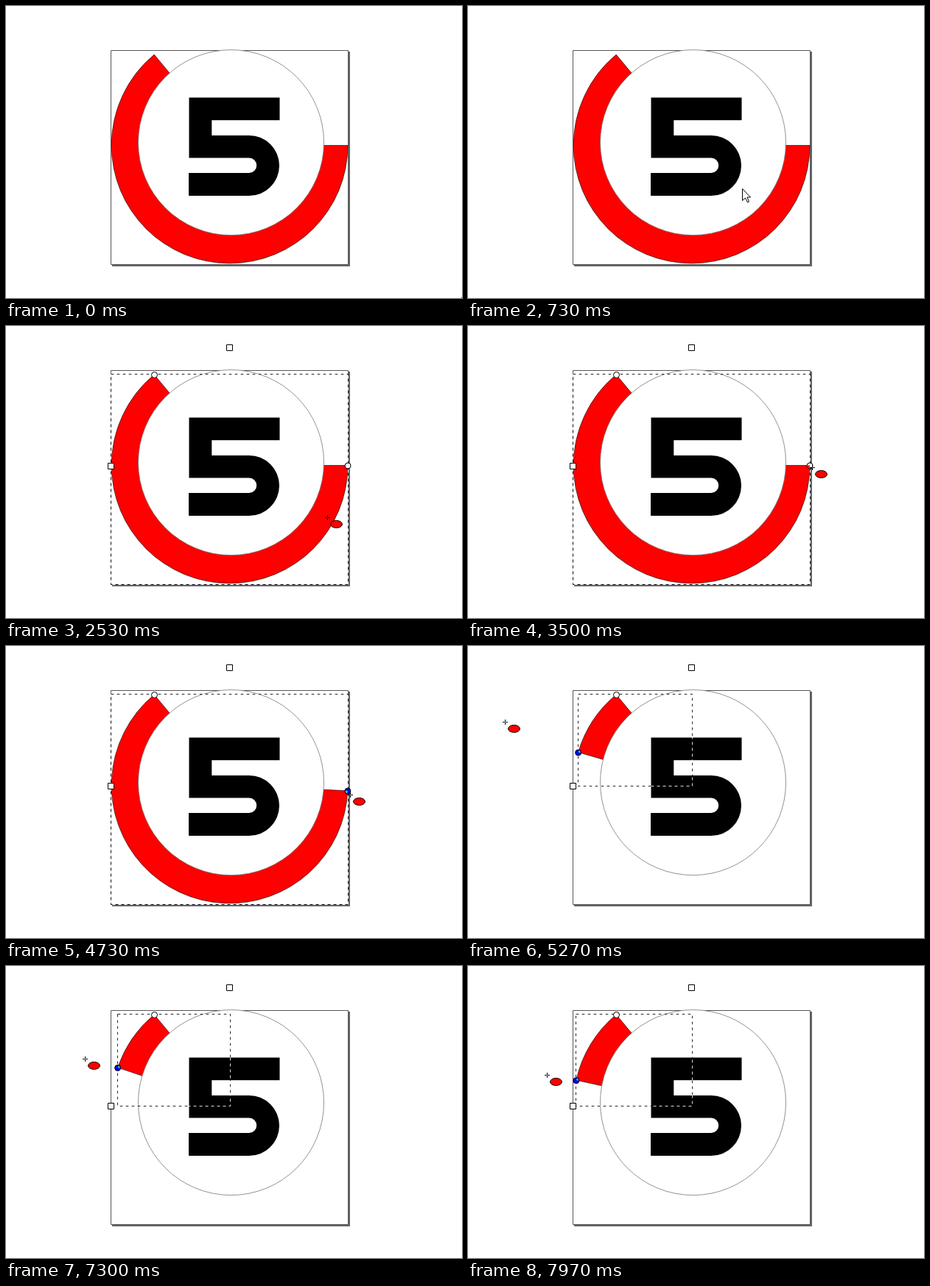
Animation of 619x397 px, one loop 8 s. Source, as an HTML page with a canvas:

```html
<!DOCTYPE html>
<html lang="en">
<head>
<meta charset="utf-8">
<title>Dragging an arc handle</title>
<style>
  html, body { margin: 0; width: 100%; height: 100%; overflow: hidden; background: #fff; }
  canvas { display: block; }
</style>
</head>
<body>
<canvas id="stage" width="619" height="397"></canvas>
<script>
const ctx = document.getElementById('stage').getContext('2d');
const LOOP = 8000, TICK = 100 / 3, TAU = Math.PI * 2, DEG = Math.PI / 180;
const HOVER = 1225, SELECT = 1360, EDIT = 2525, PRESS = 4095;
const GRAB = 1.5; // pointer sits this far below the handle it holds
const pie = { x: 303.6, y: 189.5, r: 160.4 };
const startAngle = Math.atan2(-123.2, -102.2) + TAU;

const mix = (a, b, u) => a + (b - a) * u;
const part = (t, from, to) => Math.min(1, Math.max(0, (t - from) / (to - from)));
const ease = (t, from, to) => { const u = part(t, from, to); return u * u * (3 - 2 * u); };

// straight moves before the drag
const moves = [
  { from: 100, to: 600, x: 351, y: 227 },
  { from: 600, to: 930, x: 409, y: 287 },
  { from: 1600, to: 2300, x: 436, y: 260 },
  { from: 2940, to: 3500, x: 467, y: 192 }
];

function approach(t) {
  let x = 618, y = 396;
  for (const m of moves) {
    const u = ease(t, m.from, m.to);
    x = mix(x, m.x, u);
    y = mix(y, m.y, u);
  }
  return [x, y];
}

// swing round the pie, then hover up and down on its left
function drag(t) {
  const swing = 1 + 200 / (1 + Math.exp((4995 - t) / 65));
  const reach = 164 + 112 * ease(swing, 90, 180);
  const x = pie.x + reach * Math.cos(swing * DEG);
  const y = pie.y + reach * Math.sin(swing * DEG);
  const bob = 20 * Math.sin(Math.PI * part(t, 5750, 6400)) ** 2;
  const restY = 97 + 2 * part(t, 5750, 6400) + bob + 49 * ease(t, 6530, 7970);
  const settle = 1 - (1 - part(t, 5245, 5567)) ** 2;
  return [mix(x, 106.5, settle), mix(y, restY, settle)];
}

const pointer = t => t < PRESS ? approach(t) : drag(t);

// the shape trails the pointer by one tick
function endAngle(t) {
  if (t < PRESS) return 0;
  const [x, y] = pointer(t - TICK);
  return (Math.atan2(y - GRAB - pie.y, x - pie.x) + TAU) % TAU;
}

function paint(fill, stroke, width = 1) {
  if (fill) { ctx.fillStyle = fill; ctx.fill(); }
  if (stroke) { ctx.strokeStyle = stroke; ctx.lineWidth = width; ctx.stroke(); }
}

function polygon(points) {
  ctx.beginPath();
  points.forEach(([x, y]) => ctx.lineTo(x, y));
  ctx.closePath();
}

function disc(x, y, r) {
  ctx.beginPath();
  ctx.arc(x, y, r, 0, TAU);
}

function box(x, y, w, h) {
  ctx.beginPath();
  ctx.rect(x, y, w, h);
}

function tracePie(end) {
  ctx.beginPath();
  ctx.moveTo(pie.x, pie.y);
  ctx.arc(pie.x, pie.y, pie.r, end, startAngle);
  ctx.closePath();
}

function drawPage() {
  box(144, 62, 323, 292);
  paint('#666');
  box(142.5, 60.5, 322, 291);
  paint('#fff', '#555');
}

function drawFive() {
  ctx.beginPath();
  ctx.moveTo(248.5, 124.5);
  ctx.lineTo(371.5, 124.5);
  ctx.lineTo(371.5, 155.3);
  ctx.lineTo(279.3, 155.3);
  ctx.lineTo(279.3, 176);
  ctx.arc(330, 217, 41, -Math.PI / 2, Math.PI / 2);
  ctx.lineTo(248, 258);
  ctx.lineTo(248, 227);
  ctx.arc(330, 216.8, 10.2, Math.PI / 2, -Math.PI / 2, true);
  ctx.lineTo(248.5, 206.6);
  ctx.closePath();
  paint('#000');
}

function drawBounds(end) {
  const ex = pie.x + pie.r * Math.cos(end), ey = pie.y + pie.r * Math.sin(end);
  const snap = v => Math.floor(v) + 0.5;
  const left = end < Math.PI ? 142.5 : snap(ex);
  const right = snap(Math.max(pie.x, ex) + 0.5);
  const bottom = end < Math.PI / 2 ? 351.5 : snap(Math.max(pie.y, ey) + 0.6);
  box(left, 65.5, right - left, bottom - 65.5);
  ctx.setLineDash([4, 4]);
  paint(null, 'rgba(0,0,0,.85)');
  ctx.lineDashOffset = 4;
  paint(null, 'rgba(255,255,255,.85)');
  ctx.lineDashOffset = 0;
  ctx.setLineDash([]);
}

function doubleArrow(x, y, turn, size) {
  ctx.save();
  ctx.translate(x, y);
  ctx.rotate(turn);
  ctx.scale(size, size);
  const half = [[-6, 0], [-1.5, -5], [-1.5, -2], [1.5, -2], [1.5, -5]];
  polygon([...half, ...half.map(([a, b]) => [-a, -b])]);
  paint('#000');
  ctx.restore();
}

function drawScaleHandles() {
  for (let i = -1; i <= 1; i++) {
    for (let j = -1; j <= 1; j++) {
      if (!i && !j) continue;
      const turn = i ? i * j * 45 : 90;
      doubleArrow(303.3 + 167.5 * i, 208.3 + 149.8 * j, turn * DEG, i && j ? 1.2 : 1);
    }
  }
}

function drawArcHandles(t, end) {
  for (const [x, y] of [[303.5, 29.5], [142.5, 190.5]]) {
    box(x - 4, y - 4, 8, 8);
    paint('#fff', '#000');
  }
  disc(201.5, 66.5, 4);
  paint('#fff', '#000');

  const x = pie.x + pie.r * Math.cos(end), y = pie.y + 0.5 + pie.r * Math.sin(end);
  const held = t >= PRESS;
  disc(x, y, 4);
  paint(held ? '#00f' : '#fff', '#000');
  if (t > 3450) {
    ctx.save();
    tracePie(end);
    ctx.clip();
    disc(x, y, 3.2);
    paint(held ? '#3c6' : '#f00');
    ctx.restore();
  }
}

function drawArrow(x, y, withMove) {
  ctx.save();
  ctx.translate(x + 0.5, y + 0.5);
  polygon([[0, 0], [0, 16], [4, 12.5], [7, 18.5], [9, 17.5], [6.5, 11.5], [11, 11.5]]);
  paint('#fff', '#000');
  if (withMove) {
    ctx.translate(21, 23);
    for (let i = 0; i < 4; i++) {
      ctx.rotate(Math.PI / 2);
      polygon([[6.5, 0], [3, -3], [3, -1], [1, -1], [1, 1], [3, 1], [3, 3]]);
      paint('#fff', '#000', 0.9);
    }
    box(-1, -1, 2, 2);
    paint('#fff');
  }
  ctx.restore();
}

function drawArcCursor(x, y) {
  ctx.fillStyle = '#000';
  for (const d of [-3, 1]) {
    ctx.fillRect(x + d, y, 3, 1);
    ctx.fillRect(x, y + d, 1, 3);
  }
  ctx.beginPath();
  ctx.ellipse(x + 12.5, y + 9.5, 8, 5, 0, 0, TAU);
  paint('#f00', '#000');
}

function draw(t) {
  const end = endAngle(t);
  const [x, y] = pointer(t).map(Math.round);
  ctx.fillStyle = '#fff';
  ctx.fillRect(0, 0, 619, 397);
  drawPage();
  tracePie(end);
  paint('#f00', 'rgba(0,0,0,.75)', 0.8);
  disc(305.5, 185.6, 126);
  paint('#fff', '#777', 0.8);
  drawFive();
  if (t >= SELECT) drawBounds(end);
  if (t >= EDIT) {
    drawArcHandles(t, end);
    drawArcCursor(x, y);
  } else {
    if (t >= SELECT) drawScaleHandles();
    drawArrow(x, y, t >= HOVER);
  }
}

function frame() {
  const t = performance.now() % LOOP;
  draw(Math.floor((t + 4) / TICK) % 240 * TICK);
  requestAnimationFrame(frame);
}
frame();
</script>
</body>
</html>
```
